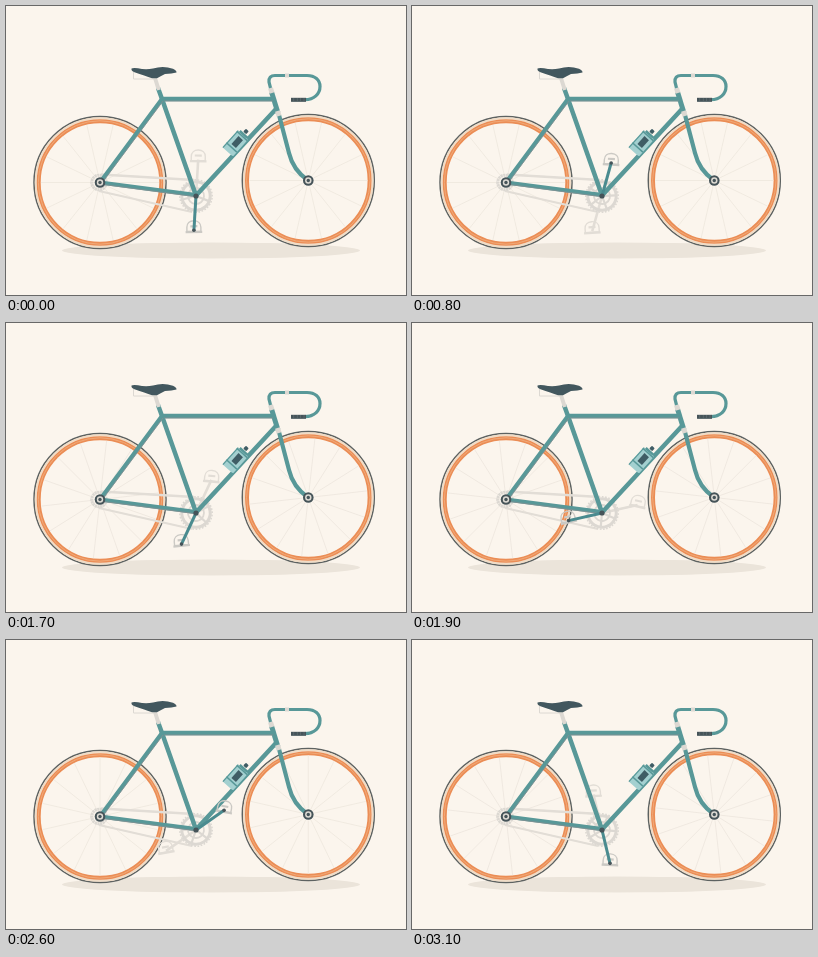
These frames come from a looping animation (400 px wide and 289 px high, 3200 ms). An HTML page:

```html
<!DOCTYPE html>
<html lang="en">
<head>
<meta charset="utf-8">
<title>Bicycle</title>
<style>
  html, body { margin: 0; width: 100%; height: 100%; overflow: hidden; background: #fbf5ed; }
  svg { display: block; width: 100vw; height: 100vh; }
  .line { fill: none; stroke-linejoin: round; }
  .teal { stroke: #589898; }
  .grey { stroke: #dcd8d2; }
  .shade { stroke: #7f9092; stroke-width: .9; }
  .spokes { stroke: #eee7de; stroke-width: .8; }
</style>
</head>
<body>
<svg viewBox="0 0 400 289">
  <defs>
    <g id="rim" class="line">
      <circle r="66" stroke="#5d6261" stroke-width="1.5"/>
      <circle r="64.3" stroke="#f0dcc6" stroke-width="1.9"/>
      <circle r="61.3" stroke="#eb8d55" stroke-width="4"/>
      <circle r="61.7" stroke="#f1ad7d" stroke-width=".9"/>
    </g>
    <g id="hub">
      <circle r="5.3" fill="#465459"/>
      <circle r="3.2" fill="#dedbd4"/>
      <circle r="1.7" fill="#465459"/>
    </g>
    <g id="pedal" class="line">
      <path d="M-7 1V-3C-7-7-4-9.5 0-9.5S7-7 7-3V1Z" stroke-width="1.4"/>
      <path d="M-8.3 1.7H8.3M-3.5-4H3.5" stroke-width="2.2"/>
    </g>
  </defs>

  <ellipse cx="205" cy="244.5" rx="149" ry="8" fill="#ebe4da"/>

  <g transform="translate(94 176.5)">
    <use href="#rim"/><path class="spokes line"/>
  </g>
  <g transform="translate(302.3 174.5)">
    <use href="#rim"/><path class="spokes line"/>
  </g>

  <!-- drivetrain behind the frame -->
  <g class="line grey">
    <g stroke="#e2ddd6">
      <path id="backArm" stroke-width="2.6"/>
      <use id="backPedal" href="#pedal"/>
      <path d="M95 168.5 188 174M93 185 186 206" stroke-width="2.3"/>
    </g>
    <circle cx="93" cy="176.5" r="7.3" stroke-width="3" stroke-dasharray="2.2 .5"/>
    <g id="chainring">
      <circle r="14.2" stroke-width="3"/>
      <circle r="16.2" stroke-width="1.5" stroke-dasharray="1.7 1.5"/>
      <circle r="8" stroke-width="1.8"/>
      <path id="spider" stroke-width="2.2"/>
    </g>
  </g>

  <!-- frame -->
  <g class="line teal" stroke-width="4.5">
    <path d="M94 176.5 156 93M94 176.5 190 189" stroke-width="4.2"/>
    <path d="M152 82 156 93 190 189.5 270 103M156 93H268"/>
    <path d="M265.5 86 272 107" stroke-width="5"/>
    <path d="M273 109 283 147Q287 164 302 174.5" stroke-width="4.2"/>
    <path class="shade" d="M158 95H267M95 178.2 188 190.5M96 177 157 95"/>
  </g>
  <g class="line grey">
    <path d="M149 72 152.8 84" stroke-width="4"/>
    <path d="M264.5 82 266 87M271.5 105 273 110" stroke-width="5"/>
    <path d="M127.5 66V73H150" stroke-width="1"/>
  </g>
  <path d="M125.5 62.5Q127 61.5 132 62.2Q139 64.2 147 62.6Q157 59.5 167 62.8Q171 65 170.5 66.6Q166 68 159 68Q155 70 151 72.3H146Q139 70 128.5 66.3Q125 65 125.5 62.5Z" fill="#42575e"/>

  <!-- handlebar -->
  <g class="line">
    <path class="teal" d="M264.5 82 263 76Q262.5 69.5 269 69.5H301C309 69.5 314 74 314 80.5C314 88 308 93.7 299 93.7H286" stroke-width="3.2"/>
    <path class="grey" d="M279 69.5H283" stroke-width="4"/>
    <path d="M285 93.8H300" stroke="#465459" stroke-width="4"/>
    <path d="M287.5 93.8H300" stroke="#657277" stroke-width="3.5" stroke-dasharray=".6 2.8"/>
  </g>

  <!-- bottle -->
  <g transform="translate(231 135.5) rotate(42)">
    <rect x="-7" y="-9" width="14" height="23" rx="1.5" fill="#a3d0d0"/>
    <path d="M-7-7.5H7M-7 8H7" stroke="#589898" stroke-width="1.5"/>
    <path d="M-6.4-9V14" stroke="#589898" stroke-width="1.2"/>
    <rect x="-2.5" y="-5" width="6" height="10.5" fill="#3f5d65"/>
    <rect x="-5" y="-11" width="10" height="2.6" fill="#589898"/>
    <rect x="-2" y="-15.5" width="4" height="4" rx="1" fill="#3f5d65"/>
  </g>

  <use href="#hub" x="94" y="176.5"/>
  <use href="#hub" x="302.3" y="174.5"/>

  <!-- near crank -->
  <use id="frontPedal" href="#pedal" stroke="#cbc9c4"/>
  <path id="frontArm" class="line" stroke="#4a8b8f" stroke-width="3"/>
  <circle id="axle" r="1.8" fill="#465459"/>
  <circle cx="190" cy="190" r="2.6" fill="#465459"/>
</svg>
<script>
const LOOP = 3200, TURN = 1600, STEP = 100;
const CENTER = { x: 190, y: 190 };
// [time in one turn, crank angle clockwise from the right]
const POSES = [[0, 93.5], [100, 115], [600, 245.5], [800, 285.5],
               [1000, 325], [1200, 364], [1500, 436.5], [1600, 453.5]];
const byId = id => document.getElementById(id);
const set = (element, name, value) => element.setAttribute(name, value);

function radial(count, inner, outer) {
  return Array.from({ length: count }, (_, i) => {
    const a = i * 2 * Math.PI / count, c = Math.cos(a), s = Math.sin(a);
    return `M${inner * c} ${inner * s}L${outer * c} ${outer * s}`;
  }).join("");
}

function crankAngle(time) {
  const next = POSES.findIndex(pose => pose[0] > time);
  const [t0, a0] = POSES[next - 1], [t1, a1] = POSES[next];
  return a0 + (a1 - a0) * (time - t0) / (t1 - t0);
}

function placeCrank(side, angle, length) {
  const a = angle * Math.PI / 180;
  const x = CENTER.x + length * Math.cos(a), y = CENTER.y + length * Math.sin(a);
  const tilt = 13 * Math.cos(a);
  set(byId(side + "Arm"), "d", `M${CENTER.x} ${CENTER.y}L${x} ${y}`);
  set(byId(side + "Pedal"), "transform", `translate(${x} ${y}) rotate(${tilt})`);
  return { x, y };
}

const spokes = document.querySelectorAll(".spokes");
spokes.forEach(path => set(path, "d", radial(14, 6, 59)));
set(byId("spider"), "d", radial(5, 2, 14));

function draw(now) {
  const time = Math.floor(now % LOOP / STEP) * STEP;
  const angle = crankAngle(time % TURN);
  const end = placeCrank("front", angle, 34.3);
  placeCrank("back", angle + 180, 36.5);
  set(byId("axle"), "cx", end.x);
  set(byId("axle"), "cy", end.y);
  set(byId("chainring"), "transform", `translate(${CENTER.x} ${CENTER.y}) rotate(${angle})`);
  spokes.forEach(path => set(path, "transform", `rotate(${time / LOOP * 1440})`));
  requestAnimationFrame(draw);
}
draw(0);
</script>
</body>
</html>
```
